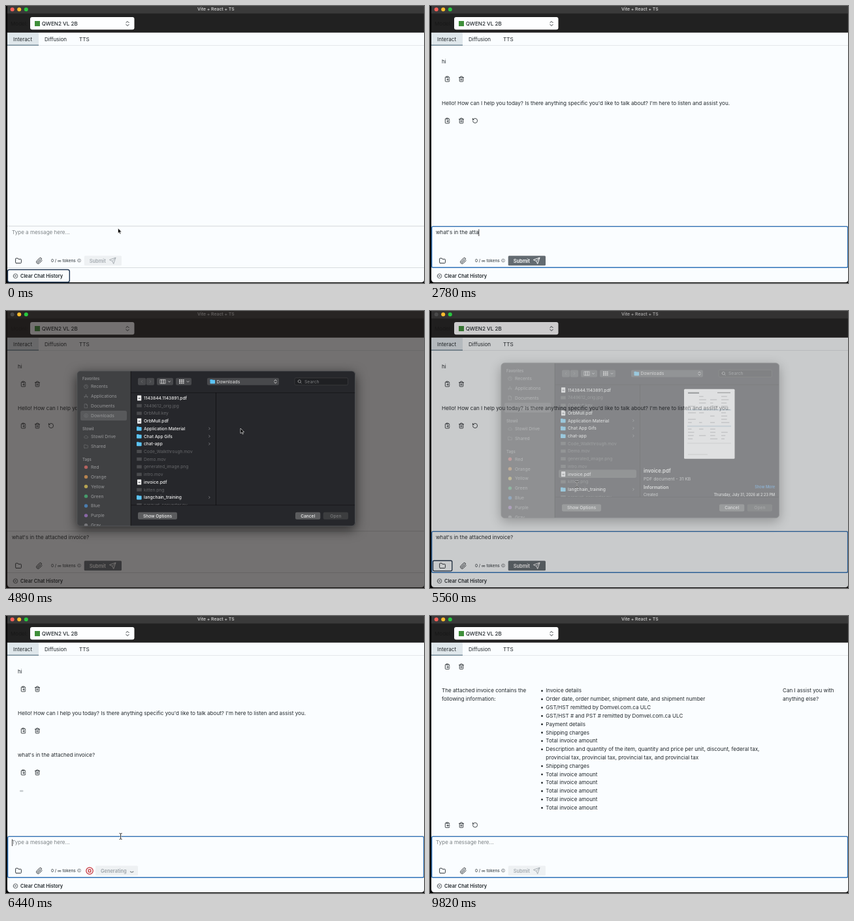
An HTML page that plays this animation: 640x425 px, repeating every 9.97 s.

```html
<!DOCTYPE html>
<html lang="en">
<head>
<meta charset="utf-8">
<title>Chat app</title>
<style>
html, body { margin: 0; width: 100%; height: 100%; overflow: hidden; background: #000; }
svg { display: block; width: 640px; height: 425px; }
text { font-family: Inter, "Open Sans", sans-serif; white-space: pre; }
.sheet { filter: drop-shadow(0 5px 9px rgba(0, 0, 0, .65)); }
</style>
</head>
<body>
<svg id="stage" viewBox="0 0 640 425"></svg>
<script>
const LOOP = 9970, TICK = 1000 / 9;
const INK = '#22282c', PAGE = '#fafdff';
const stage = document.getElementById('stage');
const pen = document.createElement('canvas').getContext('2d');

const ICONS = {
  folder: 'M4 20h16a2 2 0 0 0 2-2V8a2 2 0 0 0-2-2h-8l-2-3H4a2 2 0 0 0-2 2v13a2 2 0 0 0 2 2z',
  clip: 'm21.4 11-9.2 9.2a6 6 0 0 1-8.5-8.5l9.2-9.2a4 4 0 0 1 5.7 5.7l-9.2 9.2a2 2 0 0 1-2.8-2.8l8.5-8.5',
  trash: 'M3 6h18M19 6v14a2 2 0 0 1-2 2H7a2 2 0 0 1-2-2V6M8 6V4a2 2 0 0 1 2-2h4a2 2 0 0 1 2 2v2M10 11v6M14 11v6',
  paste: 'M8 4H6a2 2 0 0 0-2 2v14a2 2 0 0 0 2 2h12a2 2 0 0 0 2-2v-2M16 4h2a2 2 0 0 1 2 2v4M9 2h6v4H9zM21 14H11M15 10l-4 4 4 4',
  redo: 'M3 12a9 9 0 1 0 9-9 9.8 9.8 0 0 0-6.7 2.7L3 8M3 3v5h5',
  send: 'm22 2-7 20-4-9-9-4zM22 2 11 13',
  clear: 'M2 12a10 10 0 1 0 20 0a10 10 0 1 0-20 0M15 9l-6 6M9 9l6 6',
  info: 'M2 12a10 10 0 1 0 20 0a10 10 0 1 0-20 0M12 11v6M12 7v1',
  sort: 'm7 15 5 5 5-5M7 9l5-5 5 5',
  down: 'm6 9 6 6 6-6',
  right: 'm9 6 6 6-6 6',
  left: 'm15 6-6 6 6 6',
  search: 'M3 11a8 8 0 1 0 16 0a8 8 0 1 0-16 0M17 17l5 5',
  clock: 'M2 12a10 10 0 1 0 20 0a10 10 0 1 0-20 0M12 6v6l4 2',
  apps: 'M12 3 4 20M12 3l8 17M2 14h20',
  doc: 'M5 2h9l5 5v15H5zM14 2v5h5',
  load: 'M2 12a10 10 0 1 0 20 0a10 10 0 1 0-20 0M12 7v9M8 13l4 4 4-4',
  cloud: 'M7 19a5 5 0 0 1 0-10 6 6 0 0 1 11 1 4.5 4.5 0 0 1 0 9z'
};

// Drawing helpers: y is the middle of the capitals
const text = (x, y, s, size = 8.1, fill = INK, weight = 400, anchor = 'start') =>
  `<text x="${x}" y="${y + size * .36}" font-size="${size}" fill="${fill}" font-weight="${weight}" text-anchor="${anchor}">${s}</text>`;
const rect = (x, y, w, h, fill, r = 0, extra = '') =>
  `<rect x="${x}" y="${y}" width="${w}" height="${h}" rx="${r}" fill="${fill}" ${extra}/>`;
const ring = (x, y, w, h, color, r, width = 1.4) =>
  rect(x, y, w, h, 'none', r, `stroke="${color}" stroke-width="${width}"`);
const dot = (x, y, r, fill) => `<circle cx="${x}" cy="${y}" r="${r}" fill="${fill}"/>`;
const icon = (name, x, y, size = 9.5, color = INK, width = 2.1) =>
  `<path d="${ICONS[name]}" transform="translate(${x - size / 2} ${y - size / 2}) scale(${size / 24})" fill="none" stroke="${color}" stroke-width="${width}" stroke-linecap="round" stroke-linejoin="round"/>`;
const group = (attrs, body) => `<g ${attrs}>${body}</g>`;

// Conversation
const QUESTION = "what's in the attached invoice?";
const GREETING = "Hello! How can I help you today? Is there anything specific you'd like to talk about? I'm here to listen and assist you.";
const SELLER = 'Domvel.com.ca ULC';
const INTRO = ['The attached invoice contains the', 'following information:'];
const ROWS = [
  'Invoice details',
  'Order date, order number, shipment date, and shipment number',
  `GST/HST remitted by ${SELLER}`,
  `GST/HST # and PST # remitted by ${SELLER}`,
  'Payment details',
  'Shipping charges',
  'Total invoice amount',
  'Description and quantity of the item, quantity and price per unit, discount, federal tax,',
  ' provincial tax, provincial tax, provincial tax, and provincial tax',
  'Shipping charges',
  ...Array(5).fill('Total invoice amount')
];
const OUTRO = ['Can I assist you with', 'anything else?'];
const LINE = 12.82, ANSWER_Y = 277, VIEW_BOTTOM = 338;

function tools(y, redo) {
  return icon('paste', 26.5, y) + icon('trash', 48, y) + (redo ? icon('redo', 69, y) : '');
}

function pending(y, k) {
  return rect(21, y - 1.2, 5.5, 2.4, '#c6cbce', 1, `opacity="${k % 2 ? .6 : 1}"`);
}

function answer(progress, done) {
  const lines = [...INTRO, ...ROWS, ...OUTRO];
  let left = Math.round(lines.join('').length * progress);
  const shown = lines.map(s => {
    const part = s.slice(0, Math.max(0, left));
    left -= s.length;
    return part;
  });
  const rows = shown.slice(2, 2 + ROWS.length).filter(Boolean);
  const wide = rows.length < 8;
  const dx = wide ? 71 : 0;
  let out = wide
    ? text(18, ANSWER_Y, shown.slice(0, 2).join(' '))
    : text(18, ANSWER_Y, shown[0]) + text(18, ANSWER_Y + LINE, shown[1]);
  rows.forEach((s, i) => {
    const y = ANSWER_Y + i * LINE;
    if (s[0] !== ' ') out += dot(171.5 + dx, y + .4, 1.4, INK);
    out += text(177.3 + dx, y, s.trimStart());
  });
  shown.slice(-2).forEach((s, i) => out += text(540, ANSWER_Y + i * LINE, s));
  const last = ANSWER_Y + Math.max(0, rows.length - 1) * LINE;
  if (done) out += tools(last + 26.7, true);
  return { out, scroll: Math.max(0, last + (done ? 44 : 17) - VIEW_BOTTOM) };
}

function chat(k) {
  let out = '', scroll = 0;
  if (k >= 7) {
    out += text(18, 85.5, 'hi') + tools(112);
    if (k === 7) out += pending(140, k);
    else out += text(18, 149.5, GREETING.slice(0, Math.ceil(GREETING.length * Math.min(1, (k - 7) / 4))));
    if (k >= 11) out += tools(176, k < 56);
  }
  if (k >= 56) {
    out += text(18, 213.5, QUESTION) + tools(240);
    if (k < 64) out += pending(268.5, k);
    else {
      const a = answer(Math.min(1, (k - 63) / 9), k >= 72);
      out += a.out;
      scroll = a.scroll;
    }
  }
  return group('clip-path="url(#view)"', group(`transform="translate(0 ${-scroll})"`, out));
}

// Message box
function typed(k) {
  if (k === 5) return 'h';
  if (k === 6) return 'hi';
  if (k < 13 || k >= 56) return '';
  const n = k < 22 ? (k - 12) * 14 / 9
    : k < 26 ? [14, 15, 16, 18][k - 22]
    : 18 + Math.max(0, Math.min(k, 35) - 30) * 13 / 5;
  return QUESTION.slice(0, Math.floor(n + 1e-6));
}

function composer(k) {
  const value = typed(k);
  const focus = (k >= 4 && k < 41) || k >= 50;
  const onFolder = k >= 50 && k < 56;
  const busy = (k >= 7 && k < 11) || (k >= 56 && k < 72);
  let out = rect(2, 337.3, 638, 1, '#d3d7d9') + rect(2, 401, 638, 1, '#d8dcde');
  if (focus) out += ring(2.7, 338.4, 636.9, 62.9, '#2f72b8', 2);
  out += value ? text(9, 347.5, value) : text(9, 347.5, 'Type a message here...', 8.05, '#7d8386');
  const lit = k < 50 ? k < 27 || k > 28 : (k >> 1) & 1;
  if (focus && !onFolder && lit) {
    pen.font = '8.1px Inter, "Open Sans", sans-serif';
    out += rect(9 + pen.measureText(value).width, 342.5, .8, 10.5, '#111');
  }
  if (onFolder) out += ring(4.5, 383, 29.3, 15.8, '#1c2f45', 2, 1.3);
  out += icon('folder', 19, 391, 10.5) + icon('clip', 51, 391, 10.5)
    + text(69, 391, '0 / ∞ tokens', 6.3, '#41484c', 500) + icon('info', 112, 390.5, 6, '#41484c');
  if (busy) {
    out += `<circle cx="128" cy="391" r="5.2" fill="none" stroke="#c4262e" stroke-width="1.2"/>`
      + ring(126.2, 389.2, 3.6, 3.6, '#c4262e', .4, 1.2)
      + rect(137, 383.3, 65, 15, '#eef1f3', 1.5) + text(145, 391, 'Generating', 7.4, '#9ca3a8', 600)
      + `<path d="M190.2 391.8a2.9 2.9 0 0 0 5 0" fill="none" stroke="#6d7478" stroke-width="1.1" transform="rotate(${(k - 58) * 100} 192.7 391)"/>`;
  } else {
    const color = value ? '#fff' : '#a4abb0';
    out += rect(119.7, 383.3, 57.3, 15, value ? '#636b71' : '#eef1f3', 1.5)
      + text(127.7, 391, 'Submit', 7.4, color, 600) + icon('send', 163.3, 391, 11, color);
  }
  return out;
}

function shell(k) {
  return rect(0, 0, 640, 425, '#000')
    + `<path d="M2 0H640V420Q640 424 636 424H7Q2 424 2 419z" fill="${PAGE}"/>`
    + rect(2, 0, 638, 12, '#3a3a3a') + rect(2, 11.5, 638, 29.3, '#212121')
    + text(321.3, 4.6, 'Vite + React + TS', 6.8, '#c9c9c9', 600, 'middle')
    + text(7, 27, 'Model:', 8.1, '#181818')
    + rect(37, 17, 159.5, 19.3, '#fdfeff', 3) + rect(44, 23, 8, 8, '#3f8f3a')
    + text(54.7, 27, 'QWEN2 VL 2B', 8.1, INK, 450) + icon('sort', 186, 27, 10.5)
    + rect(2, 60, 638, .8, '#dfe4e6') + rect(2, 41, 48, 19.5, '#dfe7eb') + rect(2, 59.5, 48, 1.2, '#5a7585')
    + text(11, 50.7, 'Interact') + text(59, 50.7, 'Diffusion') + text(112, 50.7, 'TTS')
    + icon('clear', 14.5, 414.3, 8) + text(22, 414.3, 'Clear Chat History', 7.35, INK, 600)
    + (k < 4 ? ring(2.5, 404.5, 94.8, 19.3, '#1f3550', 3) : '');
}

// File dialog; the first letter sets the kind: p = pdf, d = folder, x = disabled
const FILES = ['p1143844.1143891.pdf', 'x7449612_orig.jpg', 'xOrbMull.key', 'pOrbMull.pdf', 'dApplication Material',
  'dChat App Gifs', 'dchat-app', 'xCode_Walkthrough.mov', 'xDemo.mov', 'xgenerated_image.png', 'xintro.mov',
  'pinvoice.pdf', 'xkitten.png', 'dlangchain_training', 'xparquet_converter.py'];
const PLACES = [['clock', 'Recents'], ['apps', 'Applications'], ['doc', 'Documents'], ['load', 'Downloads']];
const TAGS = [['Red', '#b4625f'], ['Orange', '#b5824f'], ['Yellow', '#b5a352'], ['Green', '#469a6a'],
  ['Blue', '#4a7cae'], ['Purple', '#8867a5'], ['Gray', '#77777b']];

const folderIcon = (x, y) => rect(x, y - 3.2, 3.6, 2, '#3fa9e0', .6) + rect(x, y - 2.4, 7.6, 5.8, '#5cc4f4', .8);

function sidebar() {
  const label = '#98999b';
  const head = (y, s) => text(117, y, s, 5.9, '#8b8c8e', 600);
  const item = (y, name, s) => icon(name, 122.5, y, 7, '#77797b', 1.9) + text(130, y, s, 6.8, label);
  let out = rect(109, 92, 82, 238, '#404143') + rect(114, 153, 71, 15, '#58595b', 2.5) + head(104.3, 'Favorites');
  PLACES.forEach(([name, s], i) => out += item(116 + i * 14.85, name, s));
  out += head(181, 'Stowil') + item(193, 'cloud', 'Stowil Drive') + item(207.8, 'folder', 'Shared') + head(228, 'Tags');
  TAGS.forEach(([s, color], i) => out += dot(122.5, 239.6 + i * 14.85, 2.7, color) + text(130, 239.6 + i * 14.85, s, 6.8, label));
  return out + rect(190.7, 92, .8, 238, '#111');
}

function toolbar() {
  const box = (x, w) => rect(x, 102.7, w, 11, '#48494c', 2);
  let out = box(202, 12.2) + box(214.8, 12.2) + icon('left', 208, 108.2, 7, '#7b7c7e') + icon('right', 221, 108.2, 7, '#7b7c7e')
    + box(231, 25) + box(260, 24) + box(308, 110) + icon('down', 250, 108.4, 6, '#ddd', 3) + icon('down', 278.5, 108.4, 6, '#ddd', 3);
  for (let i = 0; i < 3; i++) {
    out += ring(236 + i * 2.7, 105.3, 2.7, 5.8, '#ddd', 0, .7);
    for (let j = 0; j < 3; j++) out += rect(265 + i * 2.8, 105 + j * 2.4, 2, 1.6, '#ddd');
  }
  return out + folderIcon(312.5, 108.2) + text(322.5, 108.2, 'Downloads', 6.8, '#e6e6e6') + icon('sort', 412.5, 108.2, 8, '#e6e6e6', 2.6)
    + rect(442, 102.7, 81.5, 11, '#1f2023', 2, 'stroke="#4a4b4d" stroke-width=".5"')
    + icon('search', 449.5, 108.2, 6.5, '#c9c9c9') + text(457, 108.2, 'Search', 6.8, '#7d7e80');
}

function fileList(selected) {
  let out = selected ? rect(197, 255.8, 119, 12.6, '#4a4b4e', 2.5) : '';
  FILES.forEach((entry, i) => {
    const y = 133.5 + i * 11.73, kind = entry[0];
    out += kind === 'd' ? folderIcon(200, y) + icon('right', 311.5, y, 6, '#a0a0a2', 2.6)
      : kind === 'p' ? rect(201, y - 4, 6.2, 8, '#f2f2f2', .6) + rect(202.5, y - .5, 3.2, 2, '#8d8f92')
      : rect(200.2, y - 2.5, 7.6, 5, '#4a4b4e', .5);
    out += text(211, y, entry.slice(1), 6.65, kind === 'x' ? '#66676a' : '#f0f0f0', kind === 'x' ? 400 : 500);
  });
  return out;
}

function preview() {
  let seed = 7;
  const rnd = () => (seed = seed * 16807 % 2147483647) / 2147483647;
  let out = rect(389, 132, 77.5, 107, '#fff', 1.5) + rect(394, 163, 67, 2, '#c3d5e2') + rect(394, 188, 67, 2, '#c3d5e2')
    + rect(395, 137, 17, 2, '#55585c') + rect(440, 137, 20, 1.4, '#777');
  for (let i = 0; i < 14; i++) {
    const y = 143 + i * 5;
    if (i === 4 || i === 9) continue;
    for (let j = 0; j < 4; j++) if (rnd() > .35) out += rect(395 + j * 17, y, 4 + rnd() * 9, .8, '#85888b');
  }
  return out + rect(394, 215, 67, .5, '#aaa') + rect(395, 232, 30, .7, '#b5b5b5')
    + text(327, 258, 'invoice.pdf', 7.7, '#f2f2f2', 600) + text(327, 270, 'PDF document - 31 KB', 6.8, '#c4c5c7')
    + text(327, 282.7, 'Information', 6.9, '#f2f2f2', 600) + text(528, 282.7, 'Show More', 5.7, '#3f97ea', 500, 'end')
    + text(327, 294.5, 'Created', 5.8, '#d2d3d5') + text(528, 294.5, 'Thursday, July 31, 2026 at 2:23 PM', 5.55, '#f2f2f2', 500, 'end');
}

function dialog(k) {
  const button = (x, w, s, fill, color) => rect(x, 308.7, w, 11, fill, 2.2) + text(x + w / 2, 314.2, s, 6.65, color, 500, 'middle');
  const closing = k >= 50;
  return group(`class="sheet" transform="translate(0 ${closing ? -12.3 : 0})" opacity="${closing ? .42 : 1}"`,
    group('clip-path="url(#sheet)"',
      rect(109, 92, 426, 238, '#26272b') + sidebar() + toolbar()
      + rect(191, 125, 344, .8, '#151517') + rect(191, 297.5, 344, .8, '#151517') + rect(321, 125, .8, 173, '#0f0f11')
      + group('clip-path="url(#files)"', fileList(k >= 47) + (k >= 49 ? preview() : ''))
      + button(202, 60, 'Show Options', '#5b5c5e', '#f0f0f0') + button(443, 38.3, 'Cancel', '#5b5c5e', '#f0f0f0')
      + button(485.7, 38.3, 'Open', '#3c3d3f', '#77787a'))
    + ring(108.8, 92, 425.7, 238, '#5c5d60', 5.5, .8));
}

// Pointer: [tick, x, y, shape], held until the next entry; no shape hides it
const POINTER = [
  [0, 171.5, 341, 'arrow'], [3, 160, 349, 'beam'], [4, 150, 352, 'beam'], [5],
  [37, 118, 352, 'beam'], [38, 88, 357, 'beam'], [39, 50, 374, 'arrow'], [40, 25, 386, 'arrow'], [41, 19, 390, 'arrow'],
  [42, 22, 386, 'arrow'], [43, 34.7, 364, 'arrow'], [44, 359, 180, 'arrow'], [45, 402, 196, 'arrow'],
  [46, 322, 232, 'arrow'], [47, 223, 261.5, 'arrow'], [50, 225, 266, 'beam'], [51, 215, 288, 'arrow'], [52, 192, 332, 'arrow'],
  [53, 165, 374, 'arrow'], [55, 150, 389, 'arrow'], [57, 164, 364, 'arrow'], [58, 175.6, 338, 'beam'],
  [78, 182, 339, 'beam'], [79, 196, 341, 'beam'], [80, 211, 343, 'beam'], [81, 222, 345, 'beam'],
  [82, 230, 346, 'beam'], [83, 234, 345, 'beam'], [85, 380, 190, 'arrow'], [86, 606, 20, 'arrow'], [87]
];
const BEAM = 'd="M-2-4.6Q0-4.6 0-3.4Q0-4.6 2-4.6M0-3.4V3.4M-2 4.6Q0 4.6 0 3.4Q0 4.6 2 4.6" fill="none"';
const SHAPES = {
  arrow: '<path d="M0 0v7.8l1.8-1.6 1.3 2.8 1.3-.6-1.3-2.7h2.5z" fill="#000" stroke="#fff" stroke-width=".6"/>',
  beam: `<path ${BEAM} stroke="#fff" stroke-width="1.9"/><path ${BEAM} stroke="#111" stroke-width=".9"/>`
};

function pointer(k) {
  const [, x, y, shape] = POINTER.findLast(p => p[0] <= k);
  return shape ? group(`transform="translate(${x} ${y})"`, SHAPES[shape]) : '';
}

const DEFS = `<defs><clipPath id="view">${rect(2, 61, 638, 276)}</clipPath>
  <clipPath id="sheet">${rect(109, 92, 426, 238, '#000', 5.5)}</clipPath>
  <clipPath id="files">${rect(191, 126, 344, 171.5)}</clipPath></defs>`;

function render(k) {
  const open = k >= 44 && k <= 50;
  const lights = dot(9.7, 5.2, 3, open ? '#4a4a4a' : '#fe5f57') + dot(20.2, 5.2, 3, '#febc2e') + dot(30.8, 5.2, 3, '#28c840');
  stage.innerHTML = DEFS + shell(k) + chat(k) + composer(k)
    + (open ? rect(0, 0, 640, 425, '#1e1a18', 0, `opacity="${k < 50 ? .61 : .22}"`) : '')
    + lights + (open ? dialog(k) : '') + pointer(k);
}

const start = performance.now();
let shown = -1;
function frame() {
  const t = (performance.now() - start) % LOOP;
  const k = t >= 9820 ? 88 : Math.min(87, Math.floor((t + 4) / TICK));
  if (k !== shown) render(shown = k);
  requestAnimationFrame(frame);
}
frame();
</script>
</body>
</html>
```
